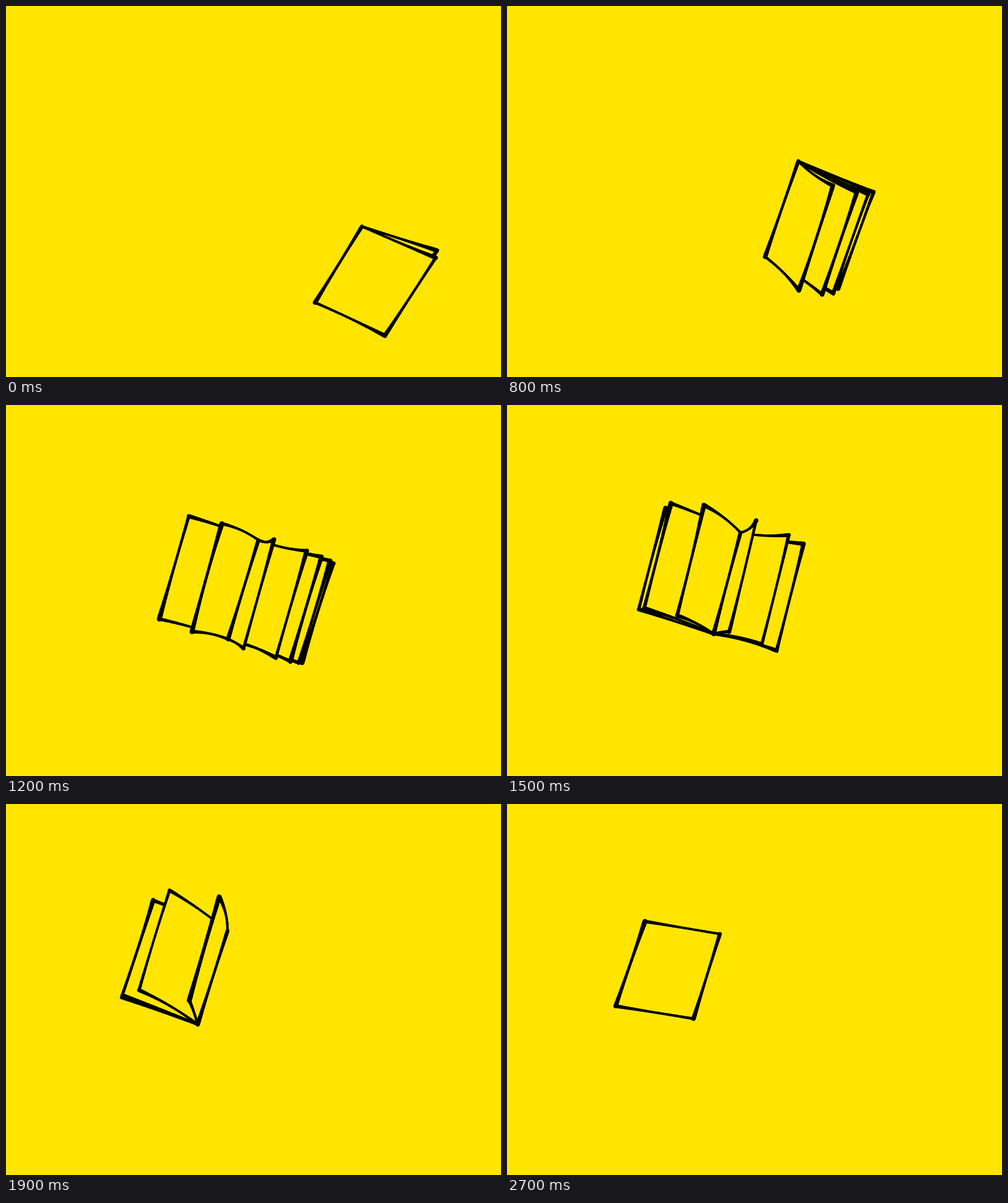
Animation of 865x648 px, one loop 2800 ms. Source, as an HTML page with a canvas:

```html
<!DOCTYPE html>
<html lang="en">
<head>
<meta charset="utf-8">
<title>Leafing book</title>
<style>
  html, body { margin: 0; width: 100%; height: 100%; overflow: hidden; background: #ffe500; }
  canvas { display: block; }
</style>
</head>
<body>
<canvas width="865" height="648"></canvas>
<script>
const PAPER = '#ffe500', INK = '#000', LOOP = 2800, STEP = 100;
const PAGES = 7, REACH = 131, THIN = 3.7;
const ctx = document.querySelector('canvas').getContext('2d');

// time, spine top x y, spine bottom x y, slope of the pages, lift of an upright page,
// lead of the first page, gap between pages, angle of the back cover
const keys = [
  [0, 622, 385, 540, 518, 42, 75, -3.4, 1, 0],
  [400, 590, 336, 519, 488, 41, 87, -3, 0.35, 0],
  [800, 509, 271, 451, 438, 54, 20, -0.55, 1.1, 0],
  [1200, 441, 236, 388, 409, 41, -10, 2, 1, 0],
  [1500, 408, 223, 361, 400, 43, -31, 3, 1, 0.57],
  [1900, 387, 222, 335, 385, 47, -55, 4.85, 1.1, 1.68],
  [2300, 375, 229, 329, 377, 28, -22, 7, 1, 2.85],
  [2700, 372, 227, 326, 375, 22, -10, 9, 1, Math.PI]
];
// Angle of a page at whole steps of its turn, from right (0) to left (PI).
const TURN = [0, 0.3, 0.57, 0.87, 1.36, 2.08, 2.76, Math.PI];

const mix = (a, b, k) => a + (b - a) * k;
const noise = n => { const v = Math.sin(n * 12.9898) * 43758.5453; return v - Math.floor(v); };

function stateAt(time) {
  let i = 0;
  while (i < keys.length - 2 && keys[i + 1][0] <= time) i++;
  const from = keys[i], to = keys[i + 1];
  const k = (time - from[0]) / (to[0] - from[0]);
  return from.map((v, n) => mix(v, to[n], k));
}

function turnAngle(progress) {
  const p = Math.min(Math.max(progress + 4, 0), TURN.length - 1.001);
  const i = Math.floor(p);
  return mix(TURN[i], TURN[i + 1], p - i);
}

// A bowed pen line that swells at both ends.
function edge(a, b, bulge, startWidth, endWidth) {
  const dx = b.x - a.x, dy = b.y - a.y, len = Math.hypot(dx, dy) || 1;
  return Array.from({ length: 25 }, (_, i) => {
    const u = i / 24, bow = 4 * u * (1 - u) * bulge / len;
    return {
      x: a.x + dx * u - dy * bow,
      y: a.y + dy * u + dx * bow,
      w: THIN + (startWidth - THIN) * (1 - u) ** 3 + (endWidth - THIN) * u ** 3
    };
  });
}

function inkEdge(points) {
  for (let i = 1; i < points.length; i++) {
    const a = points[i - 1], b = points[i];
    ctx.lineWidth = (a.w + b.w) / 2;
    ctx.beginPath();
    ctx.moveTo(a.x, a.y);
    ctx.lineTo(b.x, b.y);
    ctx.stroke();
  }
}

function drawPage(angle, head, foot, slope, lift, time, seed) {
  const cos = Math.cos(angle), sin = Math.sin(angle);
  const corner = (root, reach, rise) => ({ x: root.x + reach * cos, y: root.y + slope * cos + rise * sin });
  const upper = corner(head, REACH, lift);
  const lower = corner(foot, 124 + time / 220, lift + 18);
  const rough = n => noise(seed + n);
  const top = edge(head, upper, 4 * sin, 4.5, 6 + 2 * rough(1));
  const free = edge(upper, lower, 2 * rough(2) - 1, 5 + 4 * rough(3), 5 + 4 * rough(4));
  const bottom = edge(foot, lower, -3.5 * Math.sin(2 * angle), 5, 6 + 2 * rough(5));
  ctx.beginPath();
  for (const p of [...top, ...free, ...bottom.slice().reverse()]) ctx.lineTo(p.x, p.y);
  ctx.fill();
  [top, free, bottom].forEach(inkEdge);
}

function draw(time) {
  const [, sx, sy, ex, ey, slope, lift, lead, gap, cover] = stateAt(time);
  const head = { x: sx, y: sy }, foot = { x: ex, y: ey };
  const angles = Array.from({ length: PAGES }, (_, n) => Math.max(cover, turnAngle(lead - n * gap)));
  const leaves = [...new Set(angles)];
  const isRight = angle => angle < Math.PI / 2;

  ctx.fillStyle = PAPER;
  ctx.strokeStyle = INK;
  ctx.lineCap = 'round';
  ctx.fillRect(0, 0, 865, 648);
  // Each stack is painted from its cover towards the open middle.
  const stack = [...leaves.filter(isRight).reverse(), ...leaves.filter(a => !isRight(a))];
  stack.forEach((angle, n) => drawPage(angle, head, foot, slope, lift, time, time / STEP + n * 40));
  inkEdge(edge(head, foot, 0, 7, 8));
}

const start = performance.now();
function tick() {
  const time = (performance.now() - start) % LOOP;
  draw(Math.floor(time / STEP) * STEP);
  requestAnimationFrame(tick);
}
tick();
</script>
</body>
</html>
```
